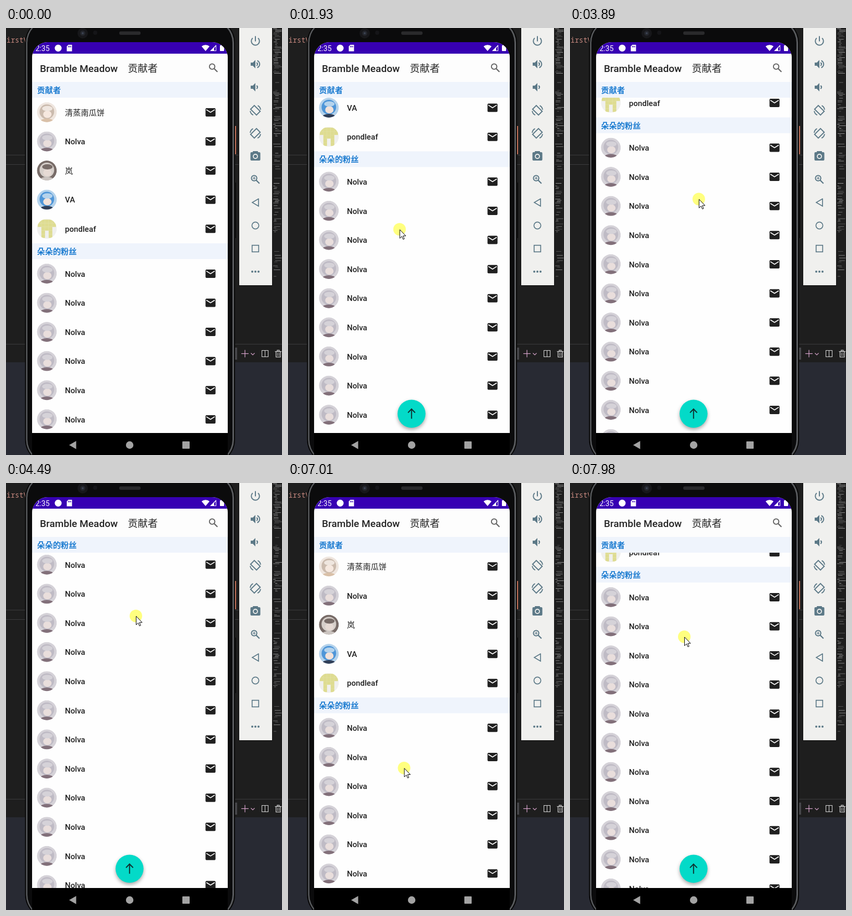
Animation, 529 px wide and 815 px high, one loop 8000 ms. Source, as an HTML page with a canvas:

```html
<!DOCTYPE html>
<html lang="zh">
<head>
<meta charset="utf-8">
<title>Contributor list</title>
<style>
html, body { margin: 0; width: 100%; height: 100%; overflow: hidden; background: #1e1e1e; }
canvas { display: block; width: 529px; height: 815px; }
</style>
</head>
<body>
<canvas id="stage"></canvas>
<script>
const W = 529, H = 815, LOOP = 8000;
const canvas = document.getElementById('stage');
const dpr = window.devicePixelRatio || 1;
canvas.width = W * dpr;
canvas.height = H * dpr;
const c = canvas.getContext('2d');

const LATIN = 'Roboto, "Noto Sans CJK SC", "Noto Sans CJK", sans-serif';
const CJK = '"Noto Sans CJK SC", "Noto Sans CJK", sans-serif';
const ROW = 55.6, HEAD = 30, TOP = 103, BOTTOM = 773;
const SECOND = HEAD + 5 * ROW;
const SLATE = '#5c7987', INK = '#202020';

// Pointer stops: time, x, y. The list follows the pointer during a drag.
const STOPS = [
  [0, 518, 845], [155, 254, 559], [340, 254, 558], [1450, 202, 444], [2200, 221, 348],
  [2830, 234, 730], [3640, 246, 355], [4490, 249, 252], [4700, 249, 241.5], [5450, 252, 726],
  [6450, 252, 726], [7005, 222, 541], [7980, 219, 290]
];
const DRAGS = [[340, 2200], [3640, 4700], [7005, LOOP]];
const CLICK = 5640, BACK = 5690, BACK_TIME = 580, LAG = 15;

const clamp = u => Math.max(0, Math.min(1, u));
const smooth = u => u * u * (3 - 2 * u);

function pointerAt(t) {
  const i = STOPS.findIndex(s => s[0] > t);
  if (i < 0) return STOPS[STOPS.length - 1].slice(1);
  const [t0, x0, y0] = STOPS[i - 1], [t1, x1, y1] = STOPS[i];
  const u = (t - t0) / (t1 - t0);
  return [x0 + (x1 - x0) * u, y0 + (y1 - y0) * u];
}

function scrollAt(t) {
  let sum = 0;
  for (const [from, to] of DRAGS) {
    if (from > BACK) sum *= 1 - smooth(clamp((t - BACK) / BACK_TIME));
    if (t > from) sum += pointerAt(from)[1] - pointerAt(Math.min(t, to))[1];
  }
  return sum;
}

// Times at which the button comes in or goes out, by scroll depth.
const toggles = [];
for (let t = 0, shown = false; t < LOOP; t += 5) {
  if (scrollAt(t) > HEAD + ROW !== shown) {
    shown = !shown;
    toggles.push({ t, shown });
  }
}

function rect(x, y, w, h, color) {
  c.fillStyle = color;
  c.fillRect(x, y, w, h);
}

function ellipse(x, y, rx, ry, color) {
  c.fillStyle = color;
  c.beginPath();
  c.ellipse(x, y, rx, ry, 0, 0, 7);
  c.fill();
}

const disc = (x, y, r, color) => ellipse(x, y, r, r, color);

function round(x, y, w, h, r, color) {
  c.fillStyle = color;
  c.beginPath();
  c.roundRect(x, y, w, h, r);
  c.fill();
}

function poly(color, ...p) {
  c.fillStyle = color;
  c.beginPath();
  for (let i = 0; i < p.length; i += 2) c.lineTo(p[i], p[i + 1]);
  c.fill();
}

function line(color, width, ...p) {
  c.strokeStyle = color;
  c.lineWidth = width;
  c.beginPath();
  for (let i = 0; i < p.length; i += 2) c.lineTo(p[i], p[i + 1]);
  c.stroke();
}

function arc(color, width, x, y, r, from = 0, to = 7) {
  c.strokeStyle = color;
  c.lineWidth = width;
  c.beginPath();
  c.arc(x, y, r, from, to);
  c.stroke();
}

function box(color, width, x, y, w, h) {
  c.strokeStyle = color;
  c.lineWidth = width;
  c.strokeRect(x, y, w, h);
}

function text(s, x, y, font, color) {
  c.font = font;
  c.fillStyle = color;
  c.fillText(s, x, y);
}

function random(seed) {
  return () => (seed = (seed * 16807) % 2147483647) / 2147483647;
}

function lens(x, y, color) {
  arc(color, 2, x - 2.4, y - 2.4, 5.2);
  line(color, 2.2, x + 1.6, y + 1.6, x + 7.8, y + 7.8);
}

function mail(x, y) {
  round(x - 9.6, y - 8, 19.2, 16, 2, INK);
  line('#fefefe', 1.7, x - 8, y - 5, x, y, x + 8, y - 5);
}

function drawDesk() {
  rect(0, 0, W, H, '#1e1e1e');
  for (const y of [242, 260, 603]) rect(0, y, W, 1, '#3c3c3e');
  rect(0, 638, W, 177, '#282a33');
  text('FirstV', -7, 28, '13.5px "Noto Sans Mono", monospace', '#c98a80');
  rect(438, 187, 3, 54, '#c9765c');
  rect(439, 610, 4, 23, '#46464a');

  const pink = '#dba7cf', pale = '#d0d0d0';
  line(pink, 1.2, 451, 621.5, 465, 621.5);
  line(pink, 1.2, 458, 614.5, 458, 628.5);
  line(pink, 1.1, 469.5, 620.5, 473, 624, 476.5, 620.5);
  box(pale, 1.1, 490.5, 615.5, 12, 12);
  line(pale, 1.1, 496.5, 615.5, 496.5, 627.5);
  line(pale, 1.2, 515.5, 617.5, 528, 617.5);
  box(pale, 1.2, 517.5, 617.5, 8.5, 10.5);
  box(pale, 1.2, 519.8, 615, 4, 2.5);
  for (const x of [520.3, 523.3]) line(pale, 1, x, 620, x, 626);
}

function drawMinimap() {
  const rnd = random(41);
  for (let y = 1; y < 478; y += 2.5) {
    const x = 512 + Math.floor(rnd() * 5), w = 3 + rnd() * 11;
    if (y > 75 && rnd() > .4) continue;
    c.globalAlpha = .2 + rnd() * .4;
    rect(x, y, w, 1, '#e6e6e6');
  }
  c.globalAlpha = 1;
}

function speaker(x, y, waves) {
  poly(SLATE, x - 9, y - 3, x - 5, y - 3, x, y - 8, x, y + 8, x - 5, y + 3, x - 9, y + 3);
  for (let i = 0; i < waves; i++) arc(SLATE, 2, x + 1, y, 3 + 4.2 * i, -1.2, 1.2);
}

function rotator(y, flip) {
  c.save();
  c.translate(478, y);
  c.scale(flip, 1);
  arc(SLATE, 1.9, 0, 0, 10, 2, 3);
  arc(SLATE, 1.9, 0, 0, 10, -1.1, -.1);
  c.rotate(-Math.PI / 4);
  box(SLATE, 2, -5, -8, 10, 16);
  c.restore();
}

function drawToolbar() {
  rect(446, 0, 65, 492, '#0f0f0f');
  rect(447, 0, 63, 491, '#f0f0ee');
  arc(SLATE, 2, 478, 25, 7.8, -.85, Math.PI + .85);
  line(SLATE, 2, 478, 15.5, 478, 25.5);
  speaker(478, 69, 2);
  speaker(478, 113, 1);
  rotator(157, 1);
  rotator(201, -1);
  round(468.5, 237, 19, 16, 2, SLATE);
  round(473, 235, 10, 5, 1, SLATE);
  arc('#f0f0ee', 1.8, 478, 245, 4);
  lens(478, 289, SLATE);
  line(SLATE, 1.2, 472.8, 286.6, 478.4, 286.6);
  line(SLATE, 1.2, 475.6, 283.8, 475.6, 289.4);
  line(SLATE, 1.7, 484, 326, 472, 333, 484, 340, 484, 325.2);
  arc(SLATE, 1.7, 478, 377, 6.6);
  box(SLATE, 1.7, 471.7, 414.7, 12.6, 12.6);
  for (const x of [472, 478, 484]) disc(x, 465, 2, SLATE);
}

function drawPhone() {
  round(36.5, -18, 402.5, 850, 46, '#070707');
  round(38.5, -16, 398.5, 846, 44, '#5a5c5f');
  round(41, -14, 393, 842, 42, '#0b0b0c');
  rect(437.5, 295, 3.5, 106, '#0c0c0c');
  disc(147, 10, 10, '#17171a');
  disc(147, 10, 5, '#24262c');
  disc(147, 10, 2, '#3c4352');
  disc(171, 9, 4, '#151518');
  round(217, 6.5, 41, 6.5, 3.2, '#2a2a2c');
  rect(50, BOTTOM, 375, 42, '#000');
  const grey = '#a3a3a3';
  poly(grey, 121, 796, 134.5, 788.3, 134.5, 803.7);
  disc(237, 796, 7.2, grey);
  round(338, 789, 14, 14, 1, grey);
}

function drawBars() {
  const purple = '#3700b3';
  rect(50, 27, 375, 22, purple);
  text('2:35', 56.5, 43.5, '14px ' + LATIN, '#fff');
  disc(100, 38.3, 6.6, '#fff');
  poly('#fff', 119.5, 32, 126.5, 32, 126.5, 44.5, 116.5, 44.5, 116.5, 35);
  for (const x of [119, 121.2, 123.4]) rect(x, 34, 1.1, 3, purple);
  c.fillStyle = '#fff';
  c.beginPath();
  c.moveTo(382.5, 44);
  c.arc(382.5, 44, 11.8, -Math.PI / 2 - .7, -Math.PI / 2 + .7);
  c.fill();
  poly('#fff', 391, 44, 403, 32, 403, 44);
  poly(purple, 399, 43, 399, 38, 402, 35, 402, 43);
  round(410, 33, 8, 11, 1, '#fff');
  rect(412, 31.8, 4, 2, '#fff');

  rect(50, 49, 375, 54, '#fdfdfd');
  text('Bramble Meadow', 65, 84, '500 19.1px ' + LATIN, '#252525');
  text('贡献者', 233.5, 84, '400 19.1px ' + CJK, '#252525');
  lens(397.5, 76, '#666');
}

// Portrait tones: backdrop, hair, skin, dress.
const TONES = {
  silver: ['#d5d2d8', '#bfbbc5', '#e9dedc', '#82707a'],
  cream: ['#efe6df', '#cbbbae', '#f6e8df', '#d9c0a8'],
  dusk: ['#786c68', '#d6cfca', '#e6dad4', '#cbc4c0'],
  blue: ['#b5d3ec', '#4f96d8', '#f2e2da', '#303f58']
};

function portrait(x, y, [back, hair, skin, dress]) {
  disc(x, y, 19, back);
  ellipse(x, y - 1, 14, 14, hair);
  ellipse(x + 1, y + 4, 8, 7, skin);
  ellipse(x + 1, y - 7, 10, 5, back);
  ellipse(x, y + 18, 13, 6, dress);
}

function blocks(x, y) {
  disc(x, y, 19, '#f0f0ee');
  ['#####', '#####', '.###.', '.#.#.', '.#.#.'].forEach((cells, j) => {
    [...cells].forEach((cell, i) => {
      if (cell === '#') rect(x - 17.5 + 7 * i, y - 17.5 + 7 * j, 7, 7, '#dedc91');
    });
  });
}

const PEOPLE = [
  ['清蒸南瓜饼', 'cream'], ['Nolva', 'silver'], ['岚', 'dusk'], ['VA', 'blue'], ['pondleaf', 'blocks']
];
const FAN = PEOPLE[1];

function drawRow([name, face], cy) {
  if (cy < TOP || cy > BOTTOM + 28) return;
  c.save();
  c.beginPath();
  c.arc(78.3, cy, 19, 0, 7);
  c.clip();
  if (face === 'blocks') blocks(78.3, cy);
  else portrait(78.3, cy, TONES[face]);
  c.restore();
  const latin = name.charCodeAt(0) < 256;
  text(name, 113, cy + 5.8, latin ? '500 15.1px ' + LATIN : '400 15.2px ' + CJK, INK);
  mail(392, cy + .1);
}

function drawHead(title, y) {
  rect(50, y, 375, HEAD, '#eff4fc');
  text(title, 59.5, y + 21, '700 15.2px ' + CJK, '#1b7bd0');
}

function drawList(scroll) {
  const y0 = TOP - scroll;
  PEOPLE.forEach((p, i) => drawRow(p, y0 + HEAD + ROW * (i + .5)));
  for (let i = 0; i < 18; i++) drawRow(FAN, y0 + SECOND + HEAD + ROW * (i + .5));
  const next = Math.max(TOP, y0 + SECOND);
  drawHead('贡献者', Math.min(TOP, next - HEAD));
  drawHead('朵朵的粉丝', next);
}

// Springs in from below, slides out again.
function drawFab(t) {
  const last = toggles.filter(g => g.t <= t).pop();
  if (!last) return;
  const d = t - last.t;
  const drop = last.shown ? 70 * Math.exp(-.012 * d) * Math.cos(.0092 * d) : .55 * d;
  if (drop > 78) return;
  const x = 236.8, y = 736.3 + drop;
  c.save();
  c.shadowColor = 'rgba(0,0,0,.34)';
  c.shadowBlur = 7 * dpr;
  c.shadowOffsetY = 3.5 * dpr;
  disc(x, y, 26.8, '#03dac8');
  c.restore();
  line('#10302f', 2, x, y + 9.5, x, y - 8.5);
  line('#10302f', 2, x - 6.8, y - 2, x, y - 9, x + 6.8, y - 2);
}

const ARROW = new Path2D('M0 0V16.5L3.9 12.9 6.4 18.6 8.7 17.6 6.3 12H11.5Z');

function drawPointer(t) {
  if (t < 20) return;
  const [x, y] = pointerAt(t - LAG);
  const down = DRAGS.some(([from, to]) => t >= from && t < to) || Math.abs(t - CLICK - 50) < 50;
  if (down) disc(x, y, 12, 'rgba(255,255,0,.5)');
  c.save();
  c.translate(x + .5, y + .5);
  c.fillStyle = '#fff';
  c.fill(ARROW);
  c.strokeStyle = '#000';
  c.lineWidth = 1;
  c.stroke(ARROW);
  c.restore();
}

function draw(t) {
  c.setTransform(dpr, 0, 0, dpr, 0, 0);
  drawDesk();
  drawMinimap();
  drawToolbar();
  drawPhone();
  c.save();
  c.beginPath();
  c.roundRect(50, 27, 375, BOTTOM - 27, [30, 30, 0, 0]);
  c.clip();
  rect(50, 27, 375, BOTTOM - 27, '#fefefe');
  drawList(scrollAt(t));
  drawFab(t);
  drawBars();
  c.restore();
  drawPointer(t);
}

const start = performance.now();
function tick() {
  draw((performance.now() - start) % LOOP);
  requestAnimationFrame(tick);
}
tick();
</script>
</body>
</html>
```
